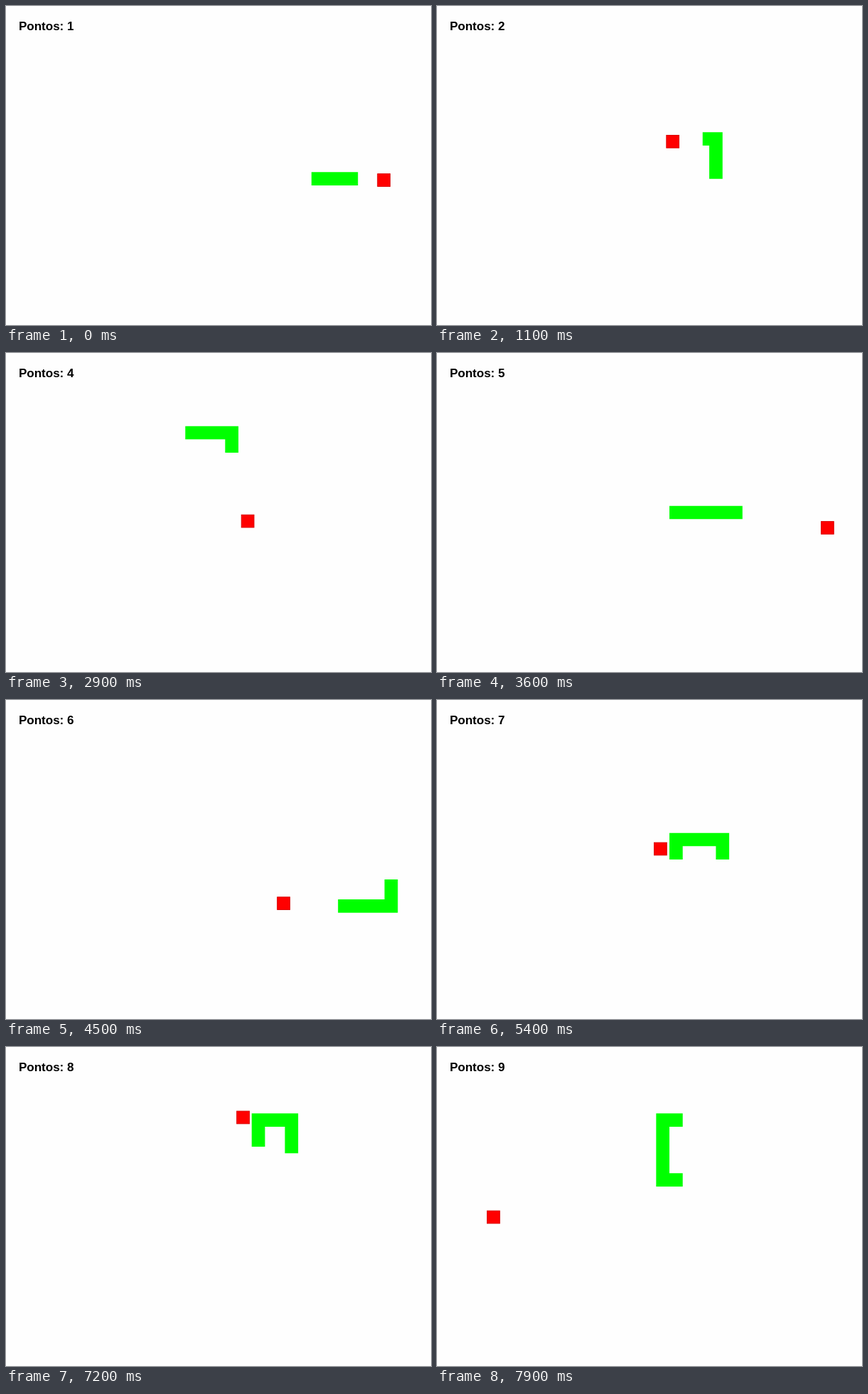
These frames come from a looping animation (598 px wide and 448 px high, 8000 ms). An HTML page:

```html
<!DOCTYPE html>
<html lang="pt">
<head>
<meta charset="utf-8">
<title>Snake</title>
<style>
  html, body { margin: 0; width: 100%; height: 100%; overflow: hidden; background: #fefefe; }
  svg { display: block; width: 598px; height: 448px; }
  text { font: bold 17px "Liberation Sans", Arial, sans-serif; fill: #000; }
</style>
</head>
<body>
<svg viewBox="0 0 598 448">
  <text id="score" x="18" y="34.4"></text>
  <g transform="scale(.934375 .933333)">
    <path id="snake" fill="#0f0"/>
    <rect id="food" width="19" height="19" fill="#f00" stroke="#d80000" stroke-width="1"/>
  </g>
</svg>
<script>
const CELL = 20, STEP = 10, FRAME = 100, LOOP = 8000;
const START = [460, 250], START_STEPS = 5;
const ROUTE = 'R8 D5 L13 U11 L5 D10 L11 U18 R8 D12 R24 D7 L15 U10 L7 D2 ' +
              'L1 D7 L5 U7 R13 U12 L5 D9 L4 U9 R2';
const FOODS = [[559, 252], [345, 194], [240, 293], [354, 243], [578, 253],
               [408, 296], [326.5, 214], [347, 96], [75, 246]];
const SLOW_FRAMES = [17, 72]; // one step is lost at each
const DIRS = { R: [1, 0], L: [-1, 0], U: [0, -1], D: [0, 1] };

const $ = id => document.getElementById(id);
const score = $('score'), snake = $('snake'), food = $('food');

// Every cell the head visits, in order.
const trail = [START];
for (const leg of ROUTE.split(' ')) {
  const [dx, dy] = DIRS[leg[0]];
  for (let n = +leg.slice(1); n > 0; n--) {
    const [x, y] = trail[trail.length - 1];
    trail.push([x + dx * STEP, y + dy * STEP]);
  }
}

const hits = (a, b) => Math.abs(a[0] - b[0]) < CELL && Math.abs(a[1] - b[1]) < CELL;

// Number of foods eaten by the time the head is on each cell.
let eaten = 0;
const eatenAt = trail.map((cell, i) => {
  if (i > START_STEPS && eaten < FOODS.length - 1 && hits(cell, FOODS[eaten])) eaten++;
  return eaten;
});

let shown = -1;
function draw(frame) {
  if (frame === shown) return;
  shown = frame;
  const lost = SLOW_FRAMES.filter(f => frame >= f).length;
  const head = Math.min(START_STEPS + 3 * frame - lost, trail.length - 1);
  const points = eatenAt[head] + 1;
  const body = trail.slice(Math.max(0, head - points - 4), head + 1);
  snake.setAttribute('d', body.map(([x, y]) =>
    `M${x} ${y}h${CELL}v${CELL}h${-CELL}z`).join(''));
  const [fx, fy] = FOODS[points - 1];
  food.setAttribute('x', fx + 0.5);
  food.setAttribute('y', fy + 0.5);
  score.textContent = 'Pontos: ' + points;
}

const begin = performance.now();
function tick() {
  const t = (performance.now() - begin) % LOOP;
  draw(Math.floor(t / FRAME));
  requestAnimationFrame(tick);
}
tick();
</script>
</body>
</html>
```
